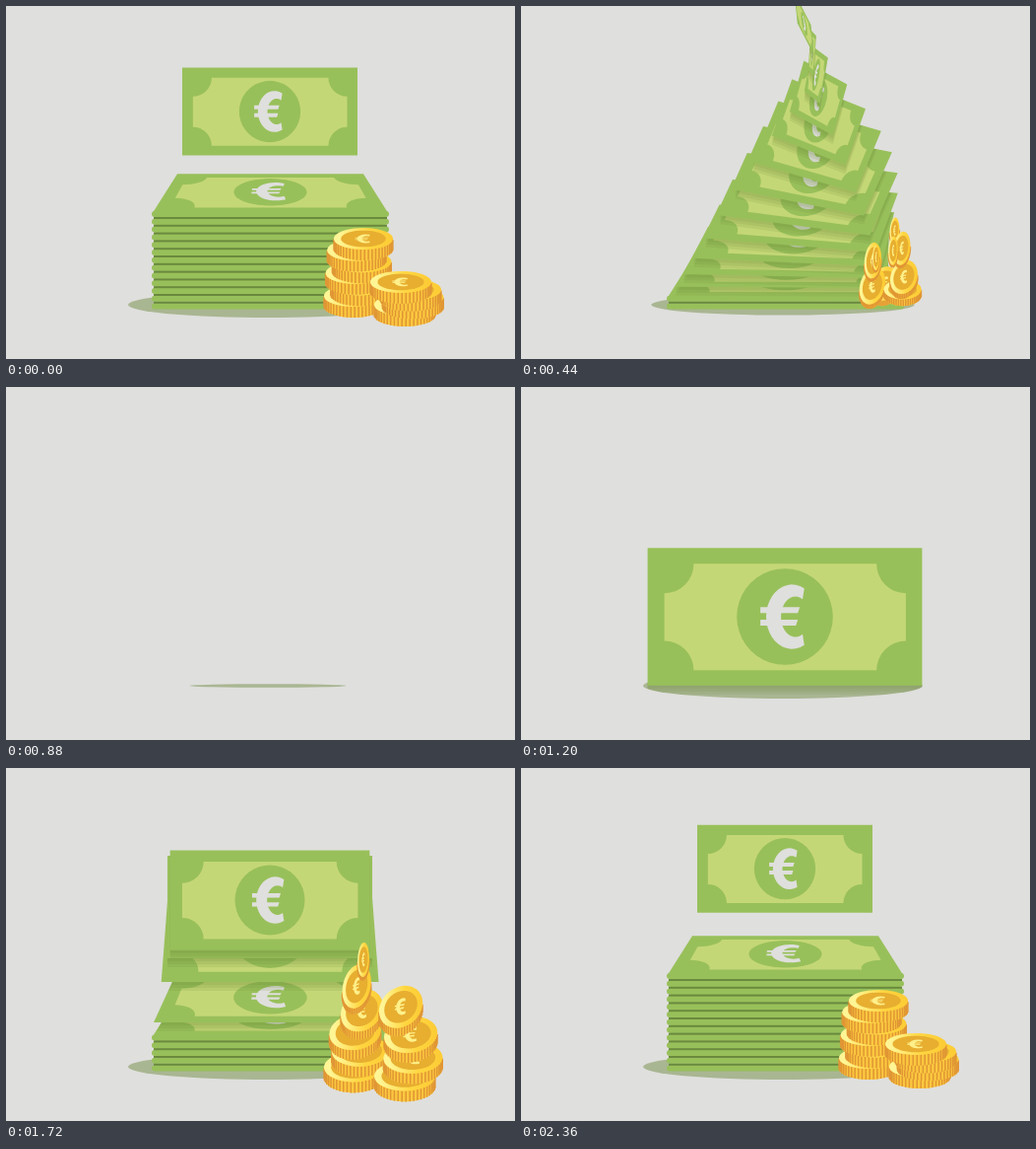
An HTML page with a canvas that plays this animation: 517 by 358 pixels, repeating every 2.44 s.

```html
<!DOCTYPE html>
<html lang="en">
<head>
<meta charset="utf-8">
<title>Money stack</title>
<style>
html, body { margin: 0; height: 100%; overflow: hidden; background: #dfdfdd; }
canvas { display: block; }
</style>
</head>
<body>
<canvas id="stage" width="517" height="358"></canvas>
<script>
const ctx = document.getElementById('stage').getContext('2d');
const LOOP = 2440, LEVELS = 12, STEP = 7.8, TAU = 2 * Math.PI;
const PAPER = '#dfdfdd', GREEN = '#98c05a', LIGHT = '#c4d776', DARK = '#6a8a3e';

const clamp = (v, lo = 0, hi = 1) => Math.min(hi, Math.max(lo, v));
const lerp = (a, b, p) => a + (b - a) * p;
const mix = (a, b, p) => a.map((v, i) => lerp(v, b[i], p));
const smooth = p => (p = clamp(p)) * p * (3 - 2 * p);
const shift = (points, dy) => points.map(([x, y]) => [x, y + dy]);
const random = n => { const v = Math.sin(n * 12.9898 + 4) * 43758.5453; return v - Math.floor(v); };

function arc(cx, cy, rx, ry, from, to, steps = 24) {
  return Array.from({ length: steps + 1 }, (_, i) => {
    const a = lerp(from, to, i / steps);
    return [cx + rx * Math.cos(a), cy + ry * Math.sin(a)];
  });
}

// Euro sign inside a unit disc: a thick bow and two slanted bars
const bar = (y, right) => [[-.51, y], [right, y], [right - .04, y + .125], [-.51, y + .125]];
const EURO = [
  [...arc(.15, 0, .54, .67, 1.08, TAU - 1.08), ...arc(.22, 0, .3, .42, TAU - 1.05, 1.05)],
  bar(-.2, .31), bar(.06, .27)
];

const SQUARE = [[0, 0], [1, 0], [1, 1], [0, 1]];
const PANEL = SQUARE.flatMap(([u, v], i) =>
  arc(u ? .941 : .061, v ? .89 : .115, .107, .214, (i + 1) * TAU / 4, i * TAU / 4, 8));
const DISC = arc(.5, .5, .175, .35, 0, TAU, 40);
const SIGN = EURO.map(part => part.map(([x, y]) => [.5 + x * .175, .5 + y * .35]));

function fill(points, colour) {
  ctx.beginPath();
  points.forEach(p => ctx.lineTo(...p));
  ctx.fillStyle = colour;
  ctx.fill();
}

// A quad lists its corners clockwise from the top left
function note([a, b, c, d]) {
  const top = Math.hypot(b[0] - a[0], b[1] - a[1]) + .001;
  const bottom = Math.hypot(c[0] - d[0], c[1] - d[1]) + .001;
  const project = ([u, v]) =>
    mix(mix(a, b, u), mix(d, c, u), v * top / (v * top + (1 - v) * bottom));
  fill(SQUARE.map(project), GREEN);
  fill(PANEL.map(project), LIGHT);
  fill(DISC.map(project), GREEN);
  SIGN.forEach(part => fill(part.map(project), PAPER));
}

// A raised note shades only what is already painted below it
function raisedNote(quad) {
  ctx.globalCompositeOperation = 'source-atop';
  for (const dy of [3, 6, 9]) fill(shift(quad, dy), 'rgba(100, 135, 50, .13)');
  ctx.globalCompositeOperation = 'source-over';
  note(quad);
}

function lip(y) {
  ctx.fillStyle = GREEN;
  ctx.beginPath();
  ctx.roundRect(148, y, 241, 6, 3);
  ctx.fill();
}

// Notes turn and shrink while climbing a bow to the top edge
function flight(age, level) {
  const q = clamp(age / 450);
  const size = 214 * (1 - q ** 1.3);
  const width = size * Math.cos(TAU / 4 * (q / .63) ** 2);
  const height = size / 2 * (.37 + .5 * smooth(q / .45));
  const tilt = 2.4 * q ** 2.5, taper = .117 * clamp(1 - q / .3);
  const lean = -.45 * height * Math.sin(Math.PI * q / .68);
  const cx = 268.5 + 34 * Math.sin(Math.PI * q) ** 2;
  const cy = 190 * (1 - smooth(1.15 * q - .07)) + level * STEP * (1 - q / 2);
  return SQUARE.map(([u, v]) => {
    const across = (u - .5) * width * (1 + taper * (2 * v - 1)), down = v - .5;
    return [cx + across * Math.cos(tilt) + down * lean, cy + across * Math.sin(tilt) + down * height];
  });
}

const flat = level => flight(0, level);

function flatNote(level) {
  const y = 210 + level * STEP;
  note(flat(level));
  lip(y - 2);
  ctx.fillStyle = DARK;
  ctx.fillRect(150, y + 4, 237, 2);
}

const upright = (w, bottom) =>
  SQUARE.map(([u, v]) => [268 + (u - .5) * w, bottom - (1 - v) * w / 2]);

function leader(t) {
  if (t < 1160) {
    const p = smooth((t - 880) / 280);
    return upright(279 * p, 303 * p);
  }
  const f = clamp(1 - (t - 1200) / 1030) ** 2;
  const dip = 5 * clamp((t - 2340) / 100) ** 2;
  return upright(178 + 101 * f, 146.5 + 156.5 * f + dip);
}

function takeOff(t) {
  const age = level => t - 150 - level * 25;
  if (age(LEVELS - 1) < 35) lip(301.6);
  for (let level = LEVELS - 1; level >= 0; level--) {
    if (age(level) < 35) flatNote(level);
    else raisedNote(flight(age(level), level));
  }
  const hover = leader(LOOP), away = flight(age(-1.5), -1.5), p = smooth(t / 280);
  raisedNote(hover.map((corner, i) => mix(corner, away[i], p)));
}

function pileUp(t) {
  if (t > 1500) lip(301.6);
  for (let i = 0; i < LEVELS; i++) {
    const start = 1350 + 53 * i, level = LEVELS - 1 - i, rest = flat(level);
    const p = smooth((t - start - 65) / 120);
    if (p === 1) flatNote(level);
    else if (t > start) raisedNote(leader(start).map((corner, k) => mix(corner, rest[k], p)));
  }
  raisedNote(leader(t));
}

function shadow(t) {
  const k = 1 - .45 * clamp((t - 400) / 315) * (1 - smooth((t - 860) / 260));
  ctx.fillStyle = '#a9b692';
  ctx.beginPath();
  ctx.ellipse(266, 303, 142 * k, 13 * k ** 3.4, 0, 0, TAU);
  ctx.fill();
}

function coin(x, y, rx, ry, thick, lean) {
  if (rx < .3) return;
  ctx.save();
  ctx.transform(1, -lean, 0, 1, x, y);
  ctx.beginPath();
  ctx.ellipse(0, thick, rx, ry, 0, 0, Math.PI);
  ctx.lineTo(-rx, 0);
  ctx.lineTo(rx, 0);
  ctx.fillStyle = '#fbc83f';
  ctx.fill();
  ctx.beginPath();
  for (let a = .1; a < Math.PI; a += .13) {
    const px = rx * Math.cos(a), py = ry * Math.sin(a);
    ctx.moveTo(px, py);
    ctx.lineTo(px, py + thick);
  }
  ctx.strokeStyle = '#e09634';
  ctx.lineWidth = 1.5;
  ctx.stroke();
  ctx.scale(rx, ry);
  const rim = ctx.createLinearGradient(-1, 0, 1, 0);
  rim.addColorStop(.1, '#fff595');
  rim.addColorStop(.6, '#ffd640');
  rim.addColorStop(1, '#fccb35');
  fill(arc(0, 0, 1, 1, 0, TAU, 40), rim);
  fill(arc(0, 0, .76, .76, 0, TAU, 40), '#e7ae30');
  EURO.forEach(part => fill(part.map(([px, py]) => [px * .55, py * .6]), '#fff08a'));
  ctx.restore();
}

const BACK = {
  count: 6, x: k => 353 + 6 * (k % 2) + .8 * k, y: k => 294 - 11.6 * k,
  rise: 40, spread: .4, first: 90, delay: 55, size: 30, seed: 1
};
const FRONT = {
  count: 4, x: k => 405 + 9 * Math.sin(1.2 * k), y: k => 303 - 7.7 * k,
  rise: 75, spread: .9, first: 150, delay: 100, size: 31, seed: 40
};

function coins(t, pile) {
  const leaving = t < 1200;
  const sink = leaving ? 0 : clamp(1 - (t - 1720) / 340);
  const scatter = smooth((t - 280) / 320), left = clamp((880 - t) / 280);
  for (let k = 0; k < pile.count; k++) {
    const air = leaving
      ? clamp((t - pile.first - (pile.count - 1 - k) * pile.delay) / 250) ** 1.15
      : clamp(1 - (t - 1470 - 45 * k) / 250) ** 2;
    let pose = [
      pile.x(k), pile.y(k) - pile.rise * air + 9.5 * sink * (1 - pile.spread * k),
      pile.size * (1 - air), 11 + 35 * air * (1 - air) + 4 * sink * (1 - air),
      9 * (1 - air) + 2
    ];
    if (leaving) {
      const r = i => random(pile.seed + 5 * k + i);
      const loose = [
        348 + 58 * r(0), 225 + 50 * r(1) + 30 * left,
        (5 + 6 * r(2)) * left, (9 + 9 * r(3)) * left, 2.5 * left
      ];
      pose = mix(pose, loose, scatter);
    }
    coin(...pose, .35 * Math.min(1, air * 2));
  }
}

function draw(t) {
  ctx.clearRect(0, 0, 517, 358);
  shadow(t);
  if (t < 960) takeOff(t);
  if (t > 880) pileUp(t);
  coins(t, BACK);
  coins(t, FRONT);
}

function tick() {
  draw(performance.now() % LOOP);
  requestAnimationFrame(tick);
}
tick();
</script>
</body>
</html>
```
